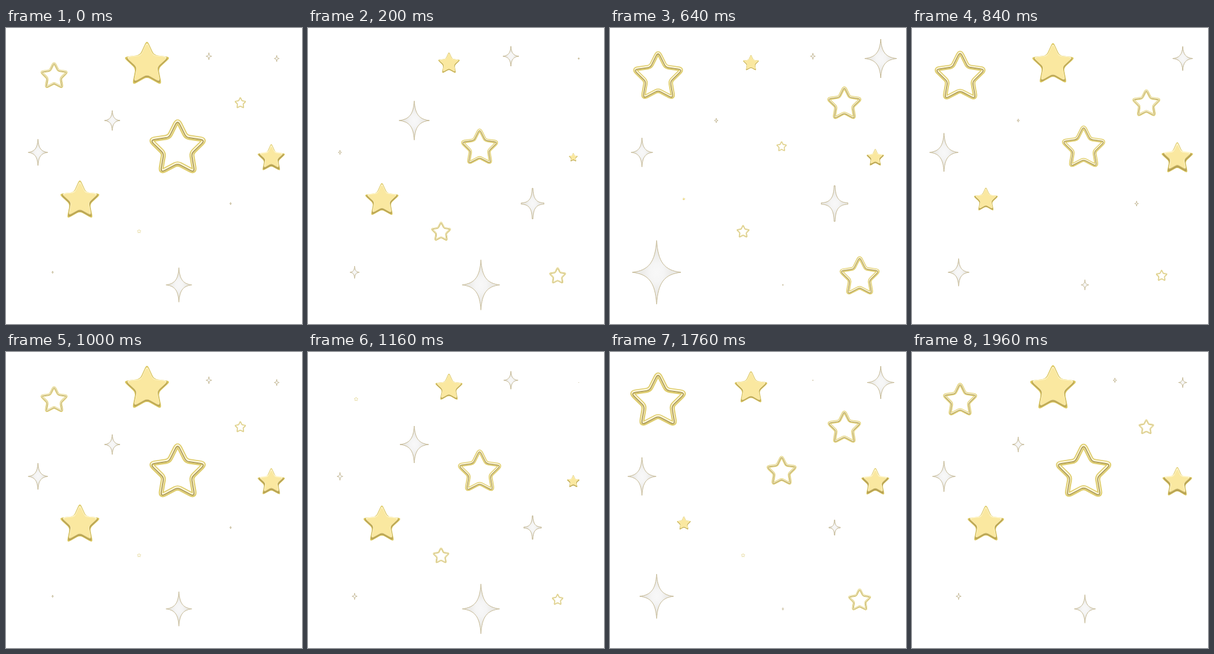
Recreate the animation shown at these times as an HTML page. Size 480 px wide and 480 px high, loop 2000 ms.

```html
<!DOCTYPE html>
<html lang="en">
<head>
<meta charset="utf-8">
<title>Twinkling stars</title>
<style>
  html, body { margin: 0; width: 100%; height: 100%; overflow: hidden; background: #fff; }
  svg { display: block; width: 100vw; height: 100vh; }
</style>
</head>
<body>
<svg id="stage" viewBox="0 0 480 480">
  <defs>
    <radialGradient id="silver" gradientUnits="userSpaceOnUse" cx="0" cy="0" r=".3">
      <stop offset="0" stop-color="#f8f8f8"/>
      <stop offset=".5" stop-color="#f5f5f5"/>
      <stop offset="1" stop-color="#ecebe8"/>
    </radialGradient>
  </defs>
</svg>
<script>
const PERIOD = 1000, STEP = 40;
const stage = document.getElementById('stage');

function add(parent, tag, attrs) {
  const node = document.createElementNS('http://www.w3.org/2000/svg', tag);
  for (const key in attrs) node.setAttribute(key, attrs[key]);
  return parent.appendChild(node);
}

// Five-pointed star about one unit wide, centred on its bounding box.
function starPath(outer, inner, tipRounding, notchRounding) {
  const points = Array.from({ length: 10 }, (_, i) => {
    const radius = i % 2 ? inner : outer, angle = i * Math.PI / 5;
    return [radius * Math.sin(angle), 0.05 - radius * Math.cos(angle)];
  });
  const toward = (a, b, part) => a.map((v, k) => (v + (b[k] - v) * part).toFixed(4));
  return points.map((p, i) => {
    const rounding = i % 2 ? notchRounding : tipRounding;
    const before = toward(p, points[(i + 9) % 10], rounding);
    const after = toward(p, points[(i + 1) % 10], rounding);
    return `${i ? 'L' : 'M'}${before} Q${p} ${after}`;
  }).join('') + 'Z';
}

// Four-pointed sparkle, one unit wide and high; tip is the half width of its ends.
function sparklePath(tip) {
  const a = 0.5, near = 0.03, far = 0.16;
  return `M${-tip},${-a} L${tip},${-a} C${near},${-far} ${far},${-near} ${a},${-tip}` +
    `L${a},${tip} C${far},${near} ${near},${far} ${tip},${a}` +
    `L${-tip},${a} C${-near},${far} ${-far},${near} ${-a},${tip}` +
    `L${-a},${-tip} C${-far},${-near} ${-near},${-far} ${-tip},${-a}Z`;
}

const SOLID = starPath(0.574, 0.275, 0.28, 0.22);
const RING = starPath(0.565, 0.283, 0.26, 0.16);

function drawSolid(group, bevel) {
  const layer = (fill, size, dy) =>
    add(group, 'path', { d: SOLID, fill, transform: `translate(0 ${dy}) scale(${size})` });
  layer('#dbc75f', 1, 0);
  layer('#b5a054', 0.93, 0.004);
  layer('#d3be6c', 0.94 - bevel * 0.5, -bevel * 0.15);
  layer('#fff5c8', 0.92 - bevel * 0.5, -bevel * 0.3);
  layer('#fae8a0', 0.92 - bevel, -bevel * 0.15);
}

function drawRing(group) {
  const line = (stroke, width, dy) => add(group, 'path', {
    d: RING, fill: 'none', stroke, 'stroke-width': width,
    transform: `translate(0 ${dy}) scale(.908)`
  });
  line('#dfcd6c', 0.098, 0);
  line('#fffae4', 0.05, -0.004);
  line('#b3a15a', 0.024, 0.008);
}

function drawSparkle(group, tip) {
  add(group, 'path', {
    d: sparklePath(tip), fill: 'url(#silver)', stroke: '#bfb28a', 'stroke-width': 0.9,
    'stroke-linejoin': 'round', 'vector-effect': 'non-scaling-stroke'
  });
}

const shapes = [];

// Each shape swells to its full size at the time "peak" and vanishes half a period later.
function place(draw, x, y, width, height, peak, smallest, option) {
  const group = add(stage, 'g', {});
  draw(group, option);
  shapes.push({ group, x, y, width, height, peak, smallest });
}
const solid = (x, y, size, peak, bevel) => place(drawSolid, x, y, size, size, peak, 1, bevel);
const ring = (x, y, size, peak) => place(drawRing, x, y, size, size, peak, 3.5);
const sparkle = (x, y, width, height, peak, tip = 0) =>
  place(drawSparkle, x, y, width, height, peak, 0.45, tip);

ring(78, 76.2, 91, 745);
ring(278.3, 191.6, 92, 0);
ring(380, 121, 57, 692);
ring(215.8, 329.5, 45, 380);
ring(404.8, 401, 79.5, 500);

solid(228.6, 56.2, 74, 940, 0.07);
solid(430.2, 209.5, 51.5, 876, 0.16);
solid(119.8, 277.2, 65.5, 62, 0.1);

sparkle(329, 45.8, 29.5, 37, 314);
sparkle(439, 49.5, 52, 63, 630);
sparkle(172.3, 150, 50.5, 65, 250);
sparkle(51.8, 201.7, 47, 63, 808);
sparkle(364.2, 284.7, 67.5, 90.5, 435, 0.02);
sparkle(75.6, 396.2, 84, 110, 560);
sparkle(280.4, 416.6, 61, 81.5, 190);

function render(time) {
  for (const s of shapes) {
    const scale = (1 + Math.cos(2 * Math.PI * (time - s.peak) / PERIOD)) / 2;
    const visible = s.width * scale >= s.smallest;
    s.group.setAttribute('display', visible ? 'inline' : 'none');
    s.group.setAttribute('transform',
      `translate(${s.x} ${s.y}) scale(${s.width * scale} ${s.height * scale})`);
  }
}

const start = performance.now();
function tick() {
  const elapsed = performance.now() - start;
  render(Math.floor(elapsed / STEP) * STEP % PERIOD);
  requestAnimationFrame(tick);
}
tick();
</script>
</body>
</html>
```
